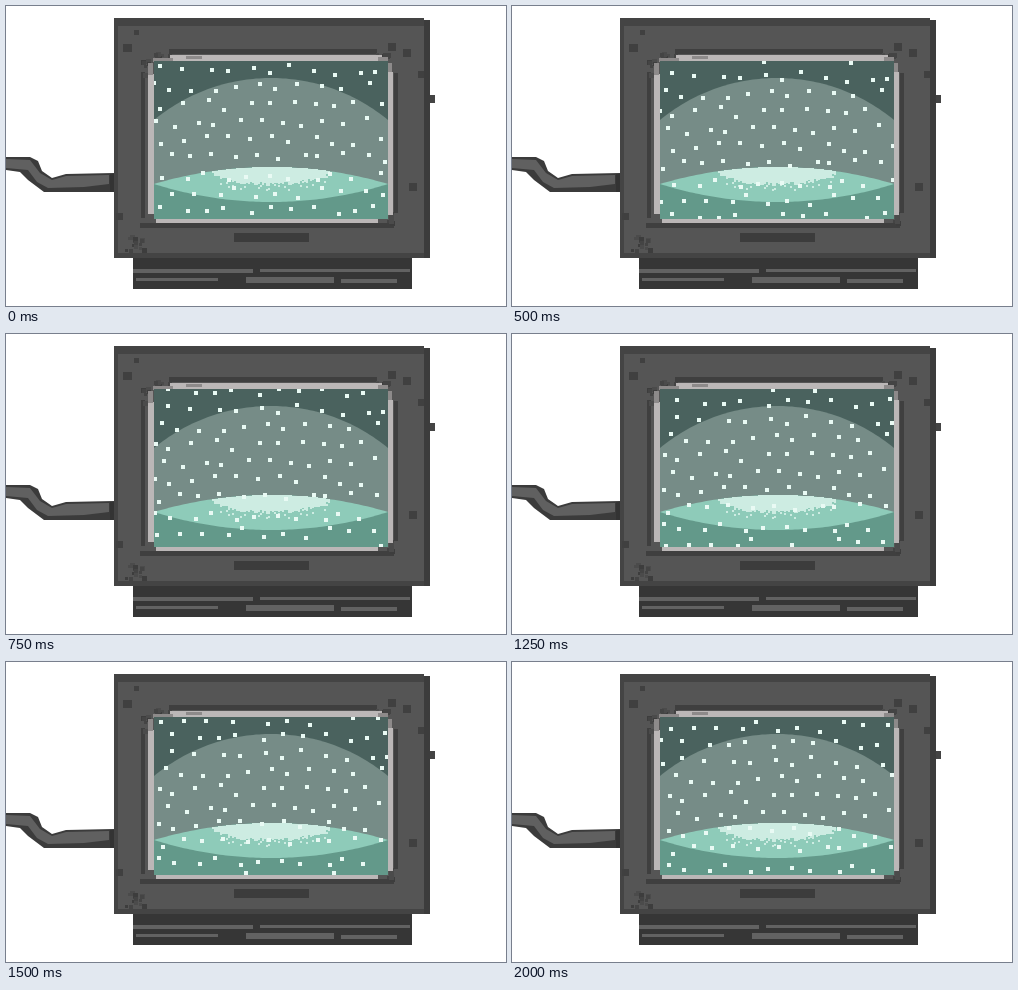
These frames come from a looping animation (500x300 px, 2.25 s). An HTML page with a canvas:

```html
<!DOCTYPE html>
<html lang="en">
<head>
<meta charset="utf-8">
<title>Snow on an old set</title>
<style>
html, body { margin: 0; width: 100%; height: 100%; overflow: hidden; background: #fff; }
canvas { display: block; }
</style>
</head>
<body>
<canvas id="stage" width="500" height="300"></canvas>
<script>
const ctx = document.getElementById('stage').getContext('2d');
const view = { x: 148, y: 55, w: 234, h: 158 };
const stepMs = 250;

// Snow drift after each step
const driftX = [0, 4, 6, 8, 10, 11, 12, 14, 16];
const driftY = [0, 3, 7, 12, 17, 23, 29, 32, 36];

function seeded(n) {
  return () => (n = (n * 16807) % 2147483647) / 2147483647;
}

// Loose rows of flakes with a little scatter
function makeFlakes(rows, cols) {
  const rand = seeded(5323);
  const list = [];
  for (let r = 0; r < rows; r++) {
    for (let c = 0; c < cols; c++) {
      const x = view.x + (c + 0.5 + (r % 2) * 0.4 + (rand() - 0.5) * 0.5) * view.w / cols;
      const y = view.y + (r + 0.5 + (rand() - 0.5) * 0.6) * view.h / rows;
      list.push([Math.round(x), Math.round(y)]);
    }
  }
  return list;
}
const flakes = makeFlakes(9, 11);

function box(g, color, ...rects) {
  g.fillStyle = color;
  for (const r of rects) g.fillRect(...r);
}

function poly(g, color, points) {
  g.fillStyle = color;
  g.beginPath();
  points.forEach(([x, y]) => g.lineTo(x, y));
  g.fill();
}

// Height of a shallow circular arc across the screen
function arcY(x, base, sag) {
  const s = Math.abs(sag);
  const r = (117 * 117 + s * s) / (2 * s);
  const d = x - 265;
  return base - Math.sign(sag) * (Math.sqrt(r * r - d * d) - r + s);
}

function arcPoints(base, sag) {
  return Array.from({ length: 79 }, (_, i) => [148 + i * 3, arcY(148 + i * 3, base, sag)]);
}

function specks(g, rand, x, y, w, h, count) {
  const darks = ['#444', '#4b4b4b', '#3d3d3d'];
  for (let i = 0; i < count; i++) {
    g.fillStyle = darks[i % darks.length];
    const s = 3 + Math.floor(rand() * 3);
    g.fillRect(Math.floor(x + rand() * w), Math.floor(y + rand() * h), s, s);
  }
}

function drawCable(g) {
  poly(g, '#3b3b3b', [[0, 151], [24, 151], [32, 155], [36, 165], [46, 172], [60, 168], [108, 167],
    [108, 186], [38, 186], [22, 174], [14, 166], [0, 164]]);
  poly(g, '#606060', [[0, 153], [24, 154], [34, 167], [46, 174], [60, 170], [103, 169],
    [103, 178], [78, 181], [42, 182], [31, 176], [22, 164], [0, 162]]);
  box(g, '#333', [104, 168, 5, 18]);
}

function drawCase(g) {
  box(g, '#363636', [127, 252, 279, 31]);
  box(g, '#626262', [127, 263, 120, 4], [254, 263, 150, 3], [130, 272, 82, 3], [240, 271, 88, 6], [335, 273, 56, 4]);

  box(g, '#555', [108, 12, 310, 240]);
  box(g, '#444', [108, 12, 310, 8], [108, 20, 4, 232], [108, 247, 316, 5], [424, 89, 5, 8]);
  box(g, '#3c3c3c', [418, 14, 6, 238], [228, 227, 75, 9]);
  box(g, '#3f3f3f', [163, 43, 208, 5], [134, 217, 254, 5], [135, 66, 4, 146], [388, 67, 4, 140]);
  box(g, '#404040', [128, 24, 5, 5], [117, 38, 9, 8], [382, 37, 8, 8],
    [397, 43, 8, 8], [403, 177, 8, 8], [412, 65, 6, 7], [110, 207, 7, 7]);

  const rand = seeded(37);
  specks(g, rand, 135, 52, 8, 16, 7);
  specks(g, rand, 145, 46, 22, 5, 7);
  specks(g, rand, 368, 47, 14, 6, 7);
  specks(g, rand, 117, 228, 20, 16, 14);
  specks(g, rand, 380, 204, 8, 12, 6);
}

function drawScreen(g) {
  box(g, '#bbb7b7', [164, 49, 212, 6], [142, 68, 6, 140], [382, 66, 5, 143], [150, 213, 222, 4]);
  box(g, '#8d8a8a', [147, 52, 20, 4], [142, 57, 5, 12], [372, 51, 10, 4], [382, 57, 4, 9], [180, 50, 16, 3]);

  box(g, '#4a625e', [view.x, view.y, view.w, view.h]);
  poly(g, '#768c87', [...arcPoints(114, 42), [382, 213], [148, 213]]);
  box(g, '#63998a', [view.x, 178, view.w, 35]);
  poly(g, '#8ecbb9', [...arcPoints(178, 17), ...arcPoints(178, -18).reverse()]);

  const rand = seeded(91);
  g.fillStyle = '#cdece2';
  for (let x = 206; x < 323; x += 2) {
    const u = (x - 265) / 60;
    const top = Math.round(arcY(x, 178, 17));
    const bottom = 165 + 13 * Math.sqrt(Math.max(0, 1 - u * u)) + rand() * 4 - 2;
    g.fillRect(x, top, 2, Math.max(2, Math.round(bottom - top)));
    if (rand() < 0.35) g.fillRect(x, Math.round(bottom + 1 + rand() * 3), 2, 2);
  }
}

const still = document.createElement('canvas');
still.width = 500;
still.height = 300;
const back = still.getContext('2d');
box(back, '#fff', [0, 0, 500, 300]);
drawCable(back);
drawCase(back);
drawScreen(back);

const wrap = (v, size) => ((v % size) + size) % size;

function draw(step) {
  ctx.drawImage(still, 0, 0);
  ctx.save();
  ctx.beginPath();
  ctx.rect(view.x, view.y, view.w, view.h);
  ctx.clip();
  ctx.fillStyle = '#e9faf4';
  for (const [x, y] of flakes) {
    const px = view.x + wrap(x + driftX[step] - view.x, view.w);
    const py = view.y + wrap(y + driftY[step] - view.y, view.h);
    ctx.fillRect(px - 2, py - 2, 4, 4);
  }
  ctx.restore();
}

const start = performance.now();
let shown = 0;
draw(0);
function tick(now) {
  const step = Math.floor(Math.max(0, now - start) / stepMs) % driftX.length;
  if (step !== shown) draw(shown = step);
  requestAnimationFrame(tick);
}
requestAnimationFrame(tick);
</script>
</body>
</html>
```
